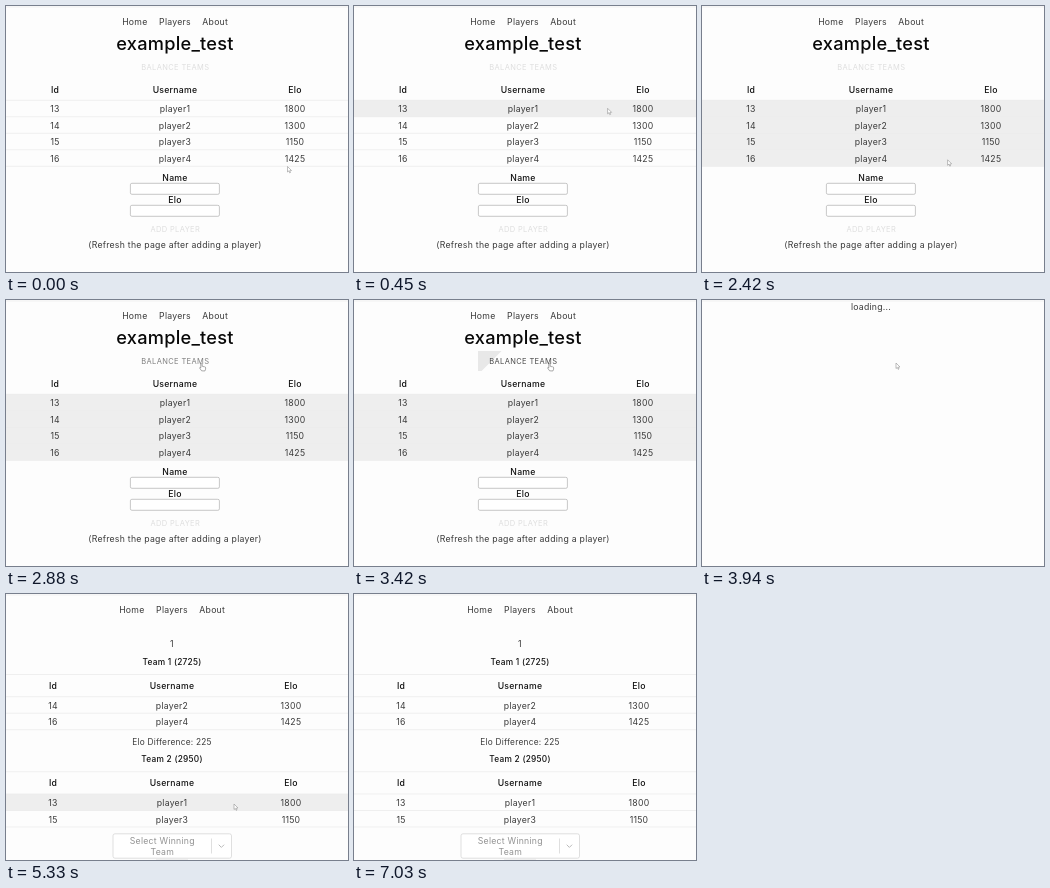
Recreate the animation shown at these times as an HTML page. Size 342 px wide and 266 px high, loop 7.56 s.

```html
<!DOCTYPE html>
<html lang="en">
<head>
<meta charset="utf-8">
<title>Team balancer</title>
<style>
html, body { margin: 0; width: 100%; height: 100%; overflow: hidden; background: #fdfdfd; }
svg { display: block; width: 100vw; height: 100vh; }
text { font: 8.7px Inter, "Open Sans", sans-serif; letter-spacing: .25px; fill: #3a3a3a; text-anchor: middle; }
.bold { font-weight: 550; fill: #111; }
.title { font-size: 18.2px; font-weight: 450; fill: #080808; }
.button { font-size: 7.5px; letter-spacing: .36px; fill: #dedede; }
.small { font-size: 8.3px; }
.select { fill: #929292; }
.rule { stroke: #eaeaea; stroke-width: .7; }
.field { fill: #fff; stroke: #b0b0b0; stroke-width: .7; }
</style>
</head>
<body>
<svg id="stage" viewBox="0 0 342 266"></svg>
<script>
const LOOP = 7560, LOADING = 3940, LOADED = 4550, ROW = 16.5;
const stage = document.getElementById('stage');
const elos = [1800, 1300, 1150, 1425];
const total = team => team.reduce((sum, i) => sum + elos[i], 0);

const text = (x, y, s, cls = '', id = '') =>
  `<text x="${x}" y="${y}" class="${cls}" id="${id}">${s}</text>`;
const rule = y => `<path class="rule" d="M0 ${y}H342"/>`;
const nav = cx => ['Home', 'Players', 'About']
  .map((s, i) => text(cx + (i - 1) * 40.2, 18.8, s)).join('');
const field = (label, y) => text(169, y, label, 'bold')
  + `<rect class="field" x="124.4" y="${y + 2.3}" width="89" height="11" rx="1.5"/>`;

// y is the header's baseline, players are indices into elos
function table(page, cx, y, gap, players) {
  const cells = (r, by, cls) => r.map((s, i) => text(cx + (i - 1) * gap, by, s, cls)).join('');
  const top = y + 7.8;
  const rows = players.map((p, i) => {
    const ry = top + i * ROW;
    return `<rect id="${page}${p}" y="${ry}" width="342" height="${ROW}" fill="#eee" opacity="0"/>`
      + rule(ry) + cells([13 + p, 'player' + (p + 1), elos[p]], ry + 12.1);
  });
  return cells(['Id', 'Username', 'Elo'], y, 'bold') + rows.join('')
    + rule(top + players.length * ROW);
}

function team(n, y, players) {
  return text(166, y, `Team ${n} (${total(players)})`, 'bold small')
    + rule(y + 9.8) + table('team', 166, y + 24.2, 119, players);
}

const listPage = nav(169)
  + text(169, 44.2, 'example_test', 'title')
  + '<clipPath id="btn"><rect x="124" y="51" width="90" height="20"/></clipPath>'
  + '<path id="sweep" fill="#e8e8e8" clip-path="url(#btn)"/>'
  + text(169.3, 63.7, 'BALANCE TEAMS', 'button', 'balance')
  + table('list', 169, 86.5, 120, [0, 1, 2, 3])
  + field('Name', 175) + field('Elo', 197)
  + text(169.3, 226, 'ADD PLAYER', 'button')
  + text(169, 242, '(Refresh the page after adding a player)');

const one = [1, 3], two = [0, 2];
const teamsPage = nav(166)
  + text(166, 53.3, '1')
  + team(1, 70.7, one)
  + text(166, 150.6, 'Elo Difference: ' + Math.abs(total(one) - total(two)), 'small')
  + team(2, 168, two)
  + '<rect x="107" y="239.8" width="118.5" height="24.4" rx="2" fill="#fff" stroke="#d2d2d2" stroke-width=".7"/>'
  + text(156.3, 250, 'Select Winning', 'select') + text(156.3, 260.5, 'Team', 'select')
  + '<path d="M205.5 244.5V259.5" stroke="#d2d2d2" stroke-width=".7"/>'
  + '<path d="M212.7 250.7L215.4 253.4L218.1 250.7" fill="none" stroke="#bbb"/>'
  + '<path d="M150 265.2H182" stroke="#e4e4e4" stroke-width=".8"/>';

stage.innerHTML = '<rect width="342" height="266" fill="#fdfdfd"/>' + rule(1)
  + `<g id="list">${listPage}</g>`
  + `<g id="loading">${text(169, 9.6, 'loading...')}</g>`
  + `<g id="teams">${teamsPage}</g>`
  + `<g id="cursor" fill="#fff" stroke-width=".6" stroke-linejoin="round">
      <path id="arrow" stroke="#929292" d="M0 0V5.5L1.3 4.4L2.2 6.4L3 6L2.2 4.2L4 4Z"/>
      <path id="hand" stroke="#707070" d="M1.6 7.8L-.4 5Q-.4 4 .8 4.8V1Q1.5 .1 2.1 1V3.4Q3 2.8 3.4 3.6Q4.2 3.1 4.6 4Q5.6 3.7 5.6 4.8V6.2L4.8 8Z"/>
    </g>`;

const $ = id => document.getElementById(id);
const ramp = (t, a, b) => Math.min(1, Math.max(0, (t - a) / (b - a)));
const smooth = k => k * k * (3 - 2 * k);
const easeOut = k => 1 - (1 - k) ** 3;
const show = (id, on) => $(id).setAttribute('visibility', on ? 'visible' : 'hidden');
const fade = (id, v) => $(id).setAttribute('opacity', v);

// Each cursor move: start, end, destination
const moves = [
  [30, 520, 252, 99], [790, 1210, 247.5, 120.5], [1360, 1790, 247, 139.5],
  [1940, 2060, 245.6, 153.8], [2420, 2700, 194, 63],
  [4120, 4390, 228, 210], [5330, 5610, 338, 206]];

function cursorAt(t) {
  let x = 281.5, y = 160.5;
  for (const [a, b, toX, toY] of moves) {
    const k = smooth(ramp(t, a, b));
    x += (toX - x) * k;
    y += (toY - y) * k;
  }
  return [x, y];
}

function draw(t) {
  show('list', t < LOADING);
  show('loading', t >= LOADING && t < LOADED);
  show('teams', t >= LOADED);

  // Rows of the list stay shaded once the cursor has crossed them
  elos.forEach((_, i) => {
    const at = 330 + i * 540;
    fade('list' + i, ramp(t, at, at + 120));
  });
  fade('team0', ramp(t, 5000, 5150) * (1 - ramp(t, 5540, 5610)));

  const shade = Math.round(222 - 150 * ramp(t, 2670, 3000));
  $('balance').style.fill = `rgb(${shade},${shade},${shade})`;
  const edge = 124 + 110 * easeOut(ramp(t, 3390, 3790));
  $('sweep').setAttribute('d', `M100 51H${edge}L${edge - 20} 71H100Z`);

  const hand = t >= 2670 && t < LOADING;
  $('cursor').setAttribute('transform', `translate(${cursorAt(t)})`);
  $('arrow').style.display = hand ? 'none' : '';
  $('hand').style.display = hand ? '' : 'none';
  show('cursor', t < 5610);
}

const start = performance.now();
function tick() {
  draw((performance.now() - start) % LOOP);
  requestAnimationFrame(tick);
}
tick();
</script>
</body>
</html>
```
